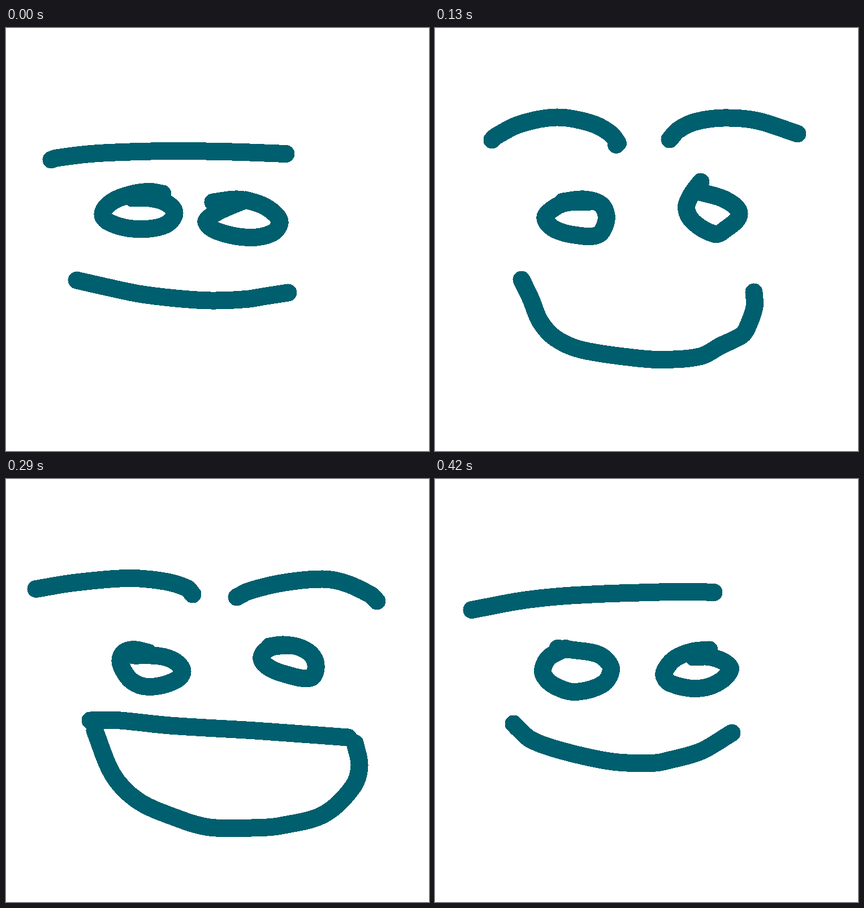
Animation, 748 px wide and 748 px high, one loop 4210 ms. Source, as an HTML page:

```html
<!DOCTYPE html>
<html lang="en">
<head>
<meta charset="utf-8">
<title>Smile</title>
<style>
  html, body { margin: 0; width: 100%; height: 100%; overflow: hidden; background: #fff; }
  svg { display: block; width: 100%; height: 100%; }
  path {
    fill: none; stroke: #005f6e; stroke-width: 31;
    stroke-linecap: round; stroke-linejoin: round;
    shape-rendering: crispEdges;
  }
</style>
</head>
<body>
<svg viewBox="0 0 748 748"><path id="face"/></svg>
<script>
// Each pose is a set of brush strokes, given by points on the centre line.
const poses = [
  [ // flat
    "80,233 89,230 150,222.5 220,219 300,217.5 400,219 495,222.5",
    "224,301 250,300.5 283,309 298,328 280,349 230,355.5 185,345 171,329 188,307 225,293 255,289.5 277,293",
    "366,308 410,303 450,312 476,329 484,345 470,363 430,370.5 378,361 354.5,345 362,333 385,320 424,304",
    "125,446 180,458.5 235,470 300,478 362,482 425,479.5 460,474 499,468"
  ],
  [ // slight smile
    "65,231.5 150,215.5 220,207.5 300,203 380,200.5 445,199 493,200.5",
    "217,299.5 250,303 284,308.5 303,320 311.5,338 296,363 247,376.5 212,366 194,350 191,335 202,315 231,299.5",
    "457,315 485,314.5 512,324 522,338 497,362 460,370.5 418,362 405.5,350 408,336 425,317 455,305 485,302",
    "139,433 149,443 168,460 207,475.5 280,494 330,501.5 390,502 407,499 470,481.5 525,449"
  ],
  [ // raised brows
    "120,232 126,218 150,200 190,185.5 245,174 303,164.5 337,165",
    "408,179 470,188.5 512,193 567,206 590,218 606,231",
    "218,307 270,309.5 305,320 327,338 320,354 300,363.5 260,368 225,364.5 196,348 185,330 193,312 215,306.5 235,308",
    "455,307 515,307.5 545,318 570,340 535,358 495,364.5 470,361 425,347 403,331 416,312 440,306 462,306",
    "152,433 161,456 182,482 235,527 270,540 318,552.5 405,557 427,554 485,529 521,497 526,472 519,456"
  ],
  [ // wide smile
    "101,198 107,192 150,170 215,158 275,168 308,185 323,203 320.5,206.5",
    "415,197 430,180.5 460,166 510,159 570,164 641,187",
    "226,307 263,303 292,311 303,331 299,353 288,366 262,368 215,357.5 195,337 208,320 232,309 275,307",
    "470,272 453,295 444.5,319 458,344 495,364.5 511,358 538,329 514,304 468,290",
    "153,445 169,478 186,519 212,548 257,568.5 350,583 403,586.5 470,580.5 505,562 543,543 553,528 565,493 564,467"
  ],
  [ // open mouth
    "53,194.5 120,183.5 215,175.5 280,181 320,193 330,204",
    "408,209 430,198 490,183.5 560,177 600,184 645,205 656,216",
    "225,312 270,313 298,322 312,341 296,358 252,367.5 222,357 204,331 203,315 213,304 230,302 252,307",
    "466,296 490,293 520,298 542,313 548,335 538,352 490,344 460,330 452,314 468,298 502,294",
    "149,427 195,426.5 290,436 440,445 605,457",
    "157,445 189,523 232,568 295,597 360,616 450,616.5 487,613 562,593 613,545 625,507 617,467"
  ],
  [ // laugh
    "42,197 58,176 98,150 115,145 155,142 238,149 285,169 312,184 319,193 315.5,200.5",
    "415,217 400,202 398,187 415,172 450,160 520,144.5 580,136.5 615,140 636,157 641,180 636,209",
    "188,296 215,294.5 245,302 272,317 282,336 265,353 217,359.5 170,354 153,341 144.5,318 158,298 195,287 232,292",
    "494,291 458,304 450,317 465,332 512,358 532,360.5 575,347 592,328 573,306 530,295.5 485,298 455,306",
    "152,419.5 250,427.5 320,435.5 380,438.5 490,443.5 636,448",
    "157,430 186,494 214,532 264,564.5 350,587.5 415,595.5 487,588 545,567 622,519 638,470 639,448"
  ]
];

// Smooth curve through the points; handles scale with each segment.
function curve(text) {
  const p = text.split(" ").map(s => s.split(",").map(Number));
  const last = p.length - 1;
  const tangent = i => {
    const a = p[Math.max(i - 1, 0)], b = p[Math.min(i + 1, last)];
    const len = Math.hypot(b[0] - a[0], b[1] - a[1]);
    return [(b[0] - a[0]) / len, (b[1] - a[1]) / len];
  };
  let d = `M${p[0]}`;
  for (let i = 0; i < last; i++) {
    const a = p[i], b = p[i + 1], ta = tangent(i), tb = tangent(i + 1);
    const h = Math.hypot(b[0] - a[0], b[1] - a[1]) / 3;
    const near = a.map((v, k) => v + ta[k] * h);
    const far = b.map((v, k) => v - tb[k] * h);
    d += `C${near} ${far} ${b}`;
  }
  return d;
}

const LOOP = 4210;
const starts = [0, 40, 80, 130, 170, 210, 290, 330, 380, 420];
const shapes = poses.map(strokes => strokes.map(curve).join(""));
const face = document.getElementById("face");
let shown = -1;

function draw(time) {
  const step = starts.findLastIndex(s => s <= time % LOOP);
  const pose = step < 6 ? step : 10 - step; // up to the laugh and back
  if (pose === shown) return;
  shown = pose;
  face.setAttribute("d", shapes[pose]);
}

let origin;
function tick(now) {
  origin ??= now;
  draw(Math.max(0, now - origin));
  requestAnimationFrame(tick);
}
draw(0);
requestAnimationFrame(tick);
</script>
</body>
</html>
```
